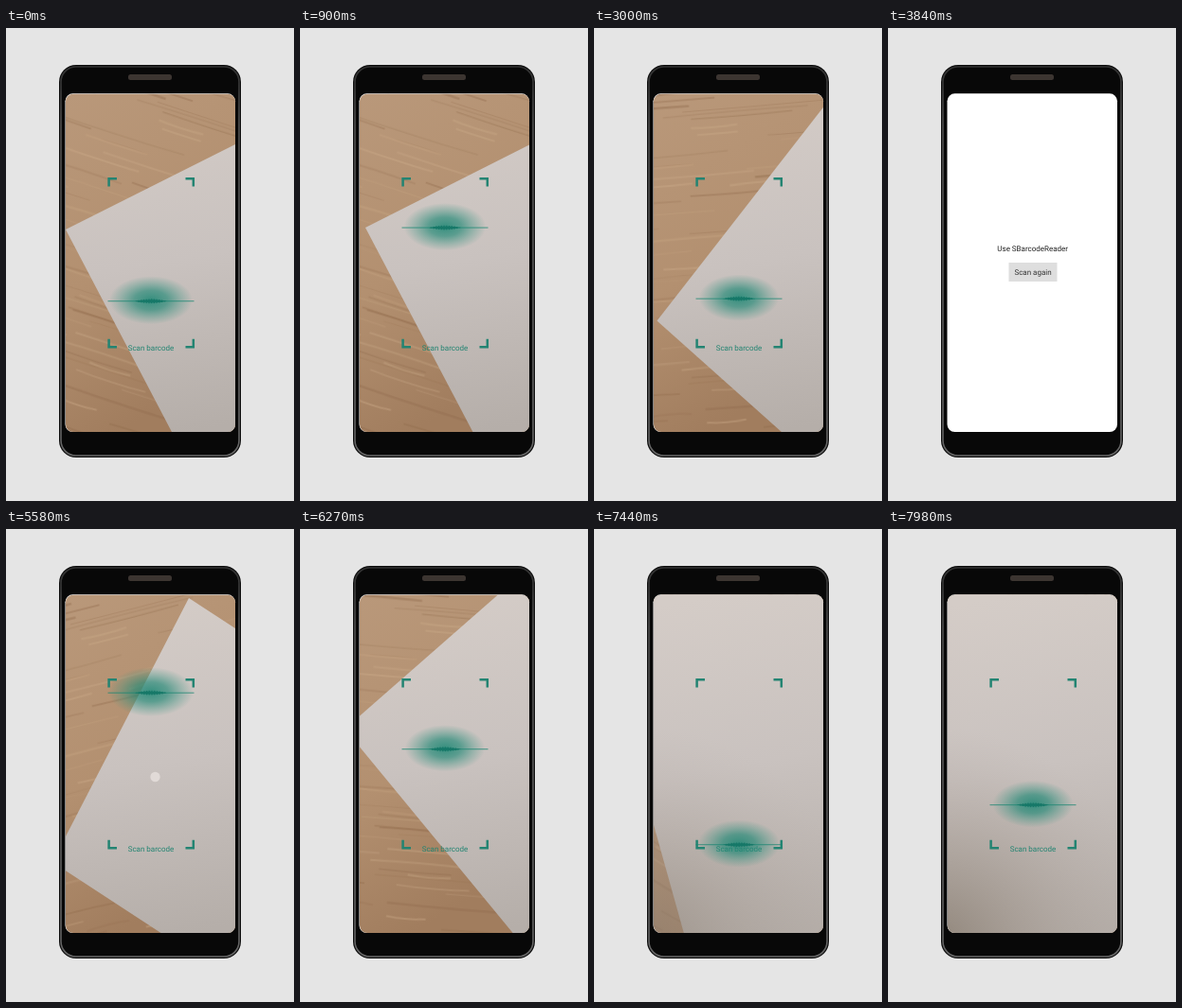
Recreate the animation shown at these times as an HTML page. Size 304 px wide and 500 px high, loop 8 s.

```html
<!DOCTYPE html>
<html lang="en">
<head>
<meta charset="utf-8">
<title>Scanner</title>
<style>
  html, body { margin: 0; width: 100%; height: 100%; overflow: hidden; background: #e5e5e5; }
  svg { display: block; width: 100vw; height: 100vh; }
  text { font: 8px Roboto, sans-serif; text-anchor: middle; text-rendering: geometricPrecision; }
</style>
</head>
<body>
<svg viewBox="0 0 304 500">
  <defs>
    <clipPath id="lens"><rect x="63" y="69.7" width="179" height="357.3" rx="8"/></clipPath>
    <linearGradient id="rim" x2="0" y2="1">
      <stop stop-color="#303030"/><stop offset=".15" stop-color="#505050"/><stop offset="1" stop-color="#666"/>
    </linearGradient>
    <linearGradient id="wood" x2=".3" y2="1">
      <stop stop-color="#b9987a"/><stop offset=".55" stop-color="#b39070"/><stop offset="1" stop-color="#a17d5e"/>
    </linearGradient>
    <linearGradient id="sheet" gradientUnits="userSpaceOnUse" x1="130" y1="70" x2="190" y2="427">
      <stop stop-color="#d4ccc7"/><stop offset=".5" stop-color="#c9c2bf"/><stop offset="1" stop-color="#b5aea9"/>
    </linearGradient>
    <radialGradient id="shadow" gradientUnits="userSpaceOnUse" cx="50" cy="440" r="230">
      <stop stop-color="#8b8074" stop-opacity=".9"/><stop offset="1" stop-color="#b5aba5" stop-opacity="0"/>
    </radialGradient>
    <radialGradient id="halo">
      <stop stop-color="#1c8673" stop-opacity=".85"/><stop offset=".4" stop-color="#1f8875" stop-opacity=".65"/>
      <stop offset=".75" stop-color="#2a8f7c" stop-opacity=".27"/><stop offset="1" stop-color="#2a8f7c" stop-opacity="0"/>
    </radialGradient>
    <filter id="soft"><feGaussianBlur stdDeviation=".7"/></filter>
    <filter id="blur"><feGaussianBlur stdDeviation="1.6"/></filter>
  </defs>

  <rect x="56" y="39" width="192" height="415" rx="18" fill="#0c0c0c"/>
  <rect x="58" y="41" width="188" height="411" rx="16" fill="#080808" stroke="url(#rim)" stroke-width="1.6"/>
  <rect x="129" y="49" width="46" height="6" rx="2.5" fill="#3c3531"/>
  <rect x="62.5" y="69.3" width="179.5" height="357.7" rx="8" fill="#fff"/>

  <g id="result">
    <text x="152.7" y="235.5" fill="#222">Use SBarcodeReader</text>
    <rect x="127.5" y="248" width="51" height="20" fill="#dedede"/>
    <text x="153" y="261" fill="#333">Scan again</text>
  </g>

  <g id="camera" clip-path="url(#lens)">
    <rect x="63" y="69" width="180" height="359" fill="url(#wood)"/>
    <g id="grain" fill="none" filter="url(#soft)"/>
    <polygon id="paper" fill="url(#sheet)" filter="url(#soft)"/>
    <rect id="shade" x="63" y="69" width="180" height="359" fill="url(#shadow)"/>
    <g id="hand" filter="url(#blur)">
      <path d="M58 318L145 345L158 372Q180 372 180 395L186 432H58Z" fill="#94705a"/>
      <path d="M58 330Q85 345 110 350Q96 362 58 362Z" fill="#4a423d"/>
      <path d="M58 385Q90 362 120 372Q150 385 160 402L180 432H58Z" fill="#564d47"/>
    </g>
    <path d="M108.6 167.5V159.2H117M189.5 159.2H197.8V167.5M108.6 328.8V337.2H117M189.5 337.2H197.8V328.8"
      fill="none" stroke="#238472" stroke-width="2.5"/>
    <text x="153" y="341" fill="#238472">Scan barcode</text>
    <g id="beam">
      <ellipse id="glow" cx="153" cy="-1" fill="url(#halo)"/>
      <path d="M107.5 0H198.5" stroke="#1c8673" stroke-width=".8"/>
      <path id="wave" fill="#167868"/>
    </g>
    <circle id="touch" cx="157.5" cy="262" r="5.2" fill="#e6dfdc" fill-opacity=".85"/>
  </g>
</svg>
<script>
const LOOP = 8000, SCAN_END = 3840, RESTART = 5400;
const TOP = 158, TRAVEL = 178, SPEED = 0.0863;
const SHEET_WIDTH = 314, SHEET_HEIGHT = 900;
const $ = id => document.getElementById(id);
const set = (id, attrs) => Object.entries(attrs).forEach(([k, v]) => $(id).setAttribute(k, v));
const ease = k => (k = Math.min(1, Math.max(0, k)), k * k * (3 - 2 * k));

// The camera's path: where the sheet's left corner is and how far its top edge tilts.
const views = [
  { t: 0, x: 63, y: 213, tilt: 26.7 },
  { t: 900, x: 69, y: 211, tilt: 26.8 },
  { t: 2160, x: 70, y: 301, tilt: 50 },
  { t: 5400, x: 49, y: 352, tilt: 62.7 },
  { t: 5580, x: 49, y: 352, tilt: 62.7 },
  { t: 6870, x: 46, y: 98, tilt: 24 },
  { t: 8000, x: -60, y: 20, tilt: 0 }
];

function viewAt(t) {
  const i = views.findIndex(v => v.t > t), a = views[i - 1], b = views[i];
  const k = ease((t - a.t) / (b.t - a.t));
  const mix = key => a[key] + (b[key] - a[key]) * k;
  return { x: mix("x"), y: mix("y"), tilt: mix("tilt") };
}

// The sheet's corner opens slightly with the tilt, as perspective does.
function sheetPoints({ x, y, tilt }) {
  const ray = (deg, len) => [len * Math.cos(deg * Math.PI / 180), len * Math.sin(deg * Math.PI / 180)];
  const [ax, ay] = ray(-tilt, SHEET_WIDTH);
  const [bx, by] = ray(84 - 0.81 * tilt, SHEET_HEIGHT);
  return [x, y, x + ax, y + ay, x + ax + bx, y + ay + by, x + bx, y + by].join(" ");
}

function beamY(t) {
  const d = SPEED * Math.abs(t - (t < RESTART ? 1516 : 5405)) % (2 * TRAVEL);
  return TOP + Math.min(d, 2 * TRAVEL - d);
}

function waveShape(t) {
  const upper = [], lower = [];
  for (let x = -17; x <= 17; x++) {
    const h = (1 - (x / 17) ** 2) * (1.9 + Math.sin(x * 2.3 + t / 90));
    upper.push(`${153 + x} ${-h}`);
    lower.unshift(`${153 + x} ${h}`);
  }
  return `M${upper.concat(lower).join("L")}Z`;
}

let seed = 7;
const rand = () => (seed = seed * 16807 % 2147483647) / 2147483647;
$("grain").innerHTML = Array.from({ length: 110 }, (_, i) => {
  const x = -70 + rand() * 280, y = -40 + i * 5 + rand() * 5, w = 40 + rand() * 120;
  const tone = rand() < .6 ? "#8d6849" : "#cbab89";
  return `<path d="M${x} ${y}q${w / 2} ${rand() * 6 - 3} ${w} 0" stroke="${tone}"
    stroke-width="${.7 + rand() * 1.8}" opacity="${.15 + rand() * .25}"/>`;
}).join("");

function draw(now) {
  const t = now % LOOP;
  const scanning = t < SCAN_END || t >= RESTART;
  $("camera").style.display = scanning ? "" : "none";
  $("result").style.display = scanning ? "none" : "";
  if (scanning) {
    const view = viewAt(t), pulse = Math.sin(t / 260);
    set("paper", { points: sheetPoints(view) });
    set("grain", { transform: `rotate(${42 - 0.9 * view.tilt} 153 248)` });
    set("hand", { opacity: ease(1.2 - Math.abs(t - 6870) / 400) });
    set("shade", { opacity: ease((t - 6700) / 1200) });
    set("beam", { transform: `translate(0 ${beamY(t)})` });
    set("glow", { rx: 44 + 2 * pulse, ry: 25.5 + pulse });
    set("wave", { d: waveShape(t) });
    $("touch").style.display = t >= RESTART && t < 5660 ? "" : "none";
  }
  requestAnimationFrame(draw);
}
requestAnimationFrame(draw);
</script>
</body>
</html>
```
